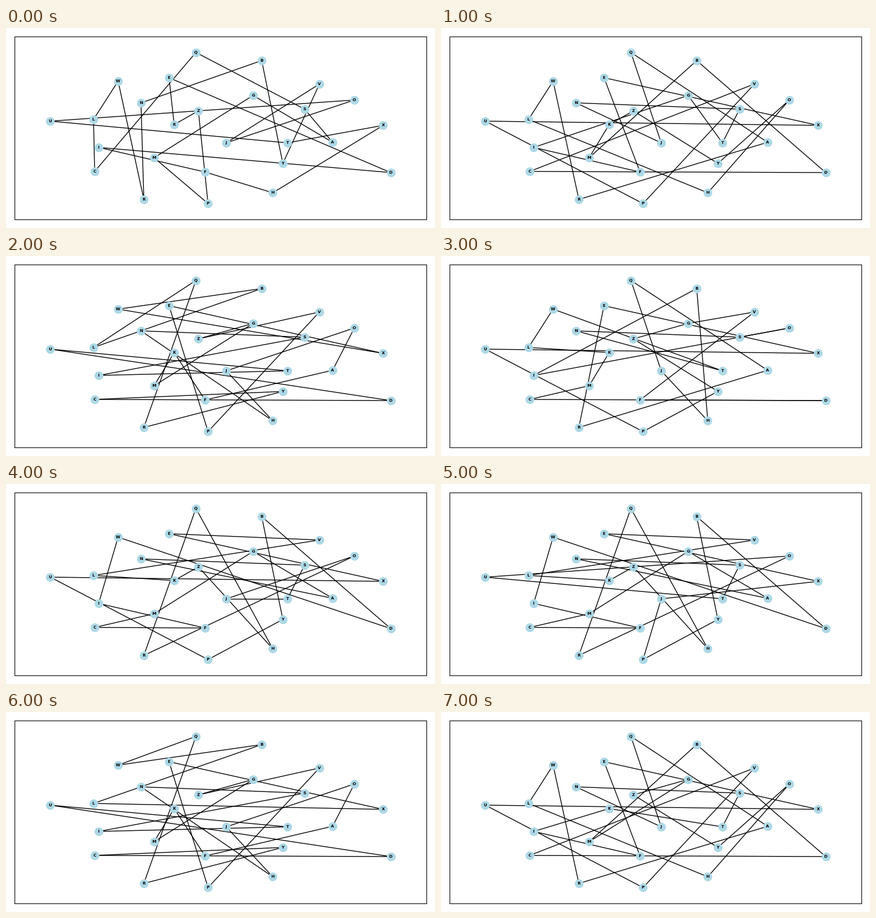
A matplotlib script for the animation above (8000 ms loop, 750 by 350 pixels).

```python
import matplotlib.pyplot as plt
from matplotlib.animation import FuncAnimation
from matplotlib.collections import LineCollection

W, H, DPI = 750, 350, 100
PAD = 15

# City positions in stage pixels
CITIES = {
    "A": (571, 200), "B": (447, 57), "C": (155, 251), "D": (672.52, 253),
    "E": (285, 87), "F": (348, 252), "G": (432, 118), "H": (466.4, 288.4),
    "I": (162, 209), "J": (385, 201), "K": (294, 169), "L": (153, 160),
    "M": (259, 227), "N": (236, 131), "O": (609, 126), "P": (353.2, 307.23),
    "Q": (332, 42.77), "R": (241, 300), "S": (522, 142), "T": (492, 201),
    "U": (77.48, 163), "V": (548, 98), "W": (196, 93), "X": (659.4, 170.4),
    "Y": (484, 237), "Z": (336.3, 145),
}


def swap(tour, a, b):
    """Exchange two cities in a tour."""
    return tour.translate(str.maketrans(a + b, b + a))


FIRST = "WLCQSAGMPZKEDIFHXTUOJVYBNR"
SECOND = "WRAQJNSTGIFEXUPVCDBMKZYOHL"
THIRD = "FAOJHNSITUDCYRQLBWXEPVZGMK"
FOURTH = "IBHJQAREXUPYZGVFDCMKLWTNSO"
FIFTH = "QROJTSNAGMCFIWDBYPUXEVLKZH"

TOURS = [
    FIRST, SECOND, THIRD, FOURTH, FIFTH,
    swap(FIFTH, "U", "J"),
    swap(THIRD, "L", "W"),
    swap(SECOND, "G", "K"),
]

fig = plt.figure(figsize=(W / DPI, H / DPI), dpi=DPI, facecolor="white")
ax = fig.add_axes([PAD / W, PAD / H, 1 - 2 * PAD / W, 1 - 2 * PAD / H])
ax.set_xlim(PAD, W - PAD)
ax.set_ylim(H - PAD, PAD)
ax.set_xticks([])
ax.set_yticks([])

roads = LineCollection([], colors="black", linewidths=1, zorder=1)
ax.add_collection(roads, autolim=False)
ax.scatter(*zip(*CITIES.values()), s=100, c="lightblue", zorder=2)
for name, (x, y) in CITIES.items():
    ax.text(x, y, name, family="DejaVu Sans", size=5, weight="bold",
            ha="center", va="center", zorder=3)


def draw(step):
    tour = TOURS[step]
    roads.set_segments([(CITIES[a], CITIES[b])
                        for a, b in zip(tour, tour[1:] + tour[0])])
    return [roads]


anim = FuncAnimation(fig, draw, frames=len(TOURS), interval=1000,
                     init_func=lambda: draw(0), repeat=True, repeat_delay=0)
plt.show()
```
